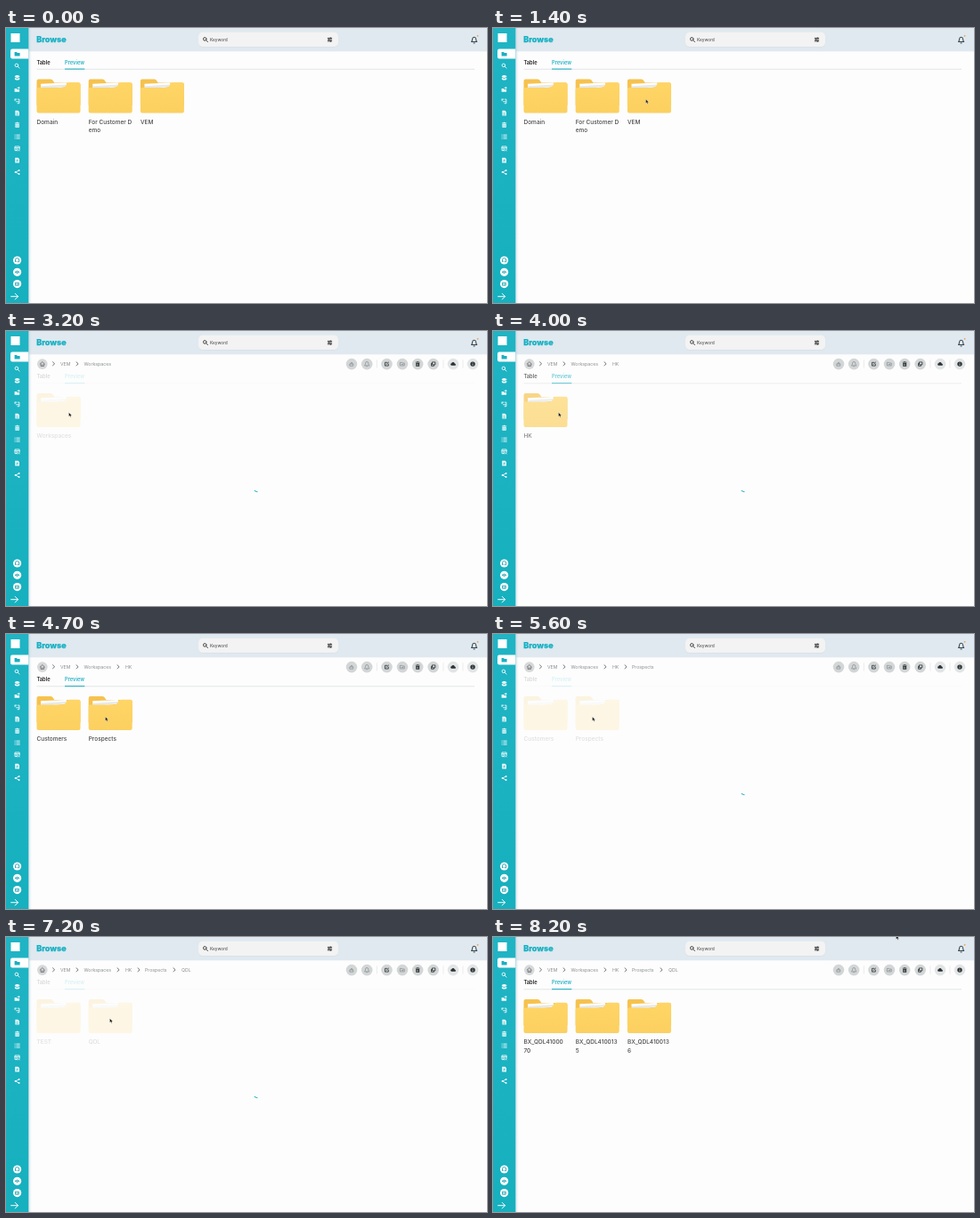
Write an HTML page that moves like this. It is 540 px wide and 309 px high and loops after 8300 ms.

```html
<!DOCTYPE html>
<html lang="en">
<head>
<meta charset="utf-8">
<title>File browser</title>
<style>
  html, body { margin: 0; width: 100%; height: 100%; overflow: hidden; background: #fdfdfd; }
  svg { display: block; width: 100vw; height: 100vh; }
  text { font-family: Inter, "Open Sans", sans-serif; fill: #444; }
  .title { font-size: 9px; font-weight: 800; fill: #16b0c3; stroke: #16b0c3; stroke-width: .25px; }
  .hint { font-size: 4.8px; }
  .tab { font-size: 5.7px; font-weight: 600; fill: #222; }
  .tab.on { fill: #28b2c6; }
  .label { font-size: 6.5px; font-weight: 500; fill: #4a4a4a; }
  .crumb { font-size: 5.2px; fill: #8b8d8f; }
  .line { fill: none; stroke: currentColor; stroke-width: .9; stroke-linecap: round; stroke-linejoin: round; }
  .fill { fill: currentColor; }
</style>
</head>
<body>
<svg viewBox="0 0 540 309" preserveAspectRatio="none">
  <defs>
    <linearGradient id="side" x2="0" y2="1">
      <stop stop-color="#20b4c4"/><stop offset="1" stop-color="#16b0be"/>
    </linearGradient>
    <linearGradient id="edge">
      <stop stop-color="#9fc5cc" stop-opacity=".55"/><stop offset="1" stop-color="#dde" stop-opacity="0"/>
    </linearGradient>
    <linearGradient id="front" x2="0" y2="1">
      <stop stop-color="#ffd566"/><stop offset="1" stop-color="#fbd060"/>
    </linearGradient>
    <g id="folder">
      <path fill="#f6c24e" d="M0 3Q0 .8 2 .8H15.5Q17.5 .8 18.5 2.6L19.8 4.6H47Q49 4.6 49 6.6V30H0Z"/>
      <path fill="#fff" d="M4.5 6L33 4.8 35 9 5 13Z"/>
      <path fill="#e6e9ea" d="M5 8.5L33 6.8V9L5 12Z"/>
      <path fill="url(#front)" d="M0 12.2Q0 10.2 2 10.2H29Q31.5 10.2 32.6 8L33.7 6Q34.7 4.4 36.8 4.4H47Q49 4.4 49 6.4V36.8Q49 38.8 47 38.8H2Q0 38.8 0 36.8Z"/>
    </g>
  </defs>
  <rect width="540" height="309" fill="#fdfdfd"/>
  <rect x="25" width="515" height="26.3" fill="#dfe9ef"/>
  <rect x="25" width="4" height="309" fill="url(#edge)"/>
  <rect width="25.3" height="309" fill="url(#side)"/>
  <rect x="5.5" y="6" width="10" height="10" fill="#fff"/>
  <path d="M7 23.6H25.3V34.4H7Q5 34.4 5 32.4V25.6Q5 23.6 7 23.6Z" fill="#fff"/>
  <text class="title" x="34.3" y="16.4">Browse</text>
  <rect x="216" y="5.2" width="157" height="16.4" rx="4.5" fill="#d3dce1"/>
  <rect x="216" y="4.8" width="157" height="16.2" rx="4.5" fill="#f3f3f3"/>
  <text class="hint" x="229" y="14.9">Keyword</text>
  <g id="chrome"></g>
  <g id="bar"></g>
  <g id="content"></g>
  <circle id="spin" cx="282.5" cy="175.7" r="5" fill="none" stroke="#35b9cb" stroke-width="1.1" stroke-dasharray="8 40" stroke-dashoffset="4"/>
  <path id="cursor" d="M0 0V4.6L1.1 3.7 1.9 5.3 2.7 4.9 2 3.4H3.4Z" fill="#111" stroke="#fff" stroke-width=".35"/>
</svg>
<script>
const LOOP = 8300, STEP = 100;
const $ = id => document.getElementById(id);

// Icons drawn around 0,0
const line = d => `<path class="line" d="${d}"/>`;
const fill = d => `<path class="fill" fill-rule="evenodd" d="${d}"/>`;
const icons = {
  folder: fill('M-3-2.2H-.6L.2-1.3H3V2.3H-3Z'),
  search: line('M1.1-.6A1.8 1.8 0 1 1-2.5-.6A1.8 1.8 0 1 1 1.1-.6M.7 .8L2.5 2.6'),
  stack: fill('M-2.7-1.8Q0-3.8 2.7-1.8V-.7Q0 1-2.7-.7ZM-2.7 .2Q0 1.7 2.7 .2V1.9Q0 3.7-2.7 1.9Z'),
  share: fill('M-3-1H-1L0 0H2.5V2.7H-3ZM0-2.2H1.6V-3.2L3.2-1.7 1.6-.3V-1.2H0Z'),
  flow: line('M-2.5-2.2H-.6M-2.5-2.2V-.6M1-2.2H2.3V0M-1 .4H2.3V2.4H.5'),
  file: fill('M-2.2-2.9H.8L2.3-1.4V2.9H-2.2ZM-1.2 0V.6H1.2V0ZM-1.2 1.3V1.9H1.2V1.3Z'),
  bin: fill('M-2.6-2.5H-1L-.6-3.1H.6L1-2.5H2.6V-1.7H-2.6ZM-2.2-1.2H2.2V2.9H-2.2ZM-1-.3V2H-.5V-.3ZM.5-.3V2H1V-.3Z'),
  list: line('M-.8-2H2.7M-.8 0H2.7M-.8 2H2.7M-2.6-2H-2.4M-2.6 0H-2.4M-2.6 2H-2.4'),
  table: line('M2.5 .3V-2.4H-2.6V2.2H0M-2.6-.7H2.5M-.5-.7V2.2M1.2 1.2L2.6 2.6M2.6 1.2L1.2 2.6'),
  page: fill('M-2.4-2.9H1L2.4-1.5V2.9H-2.4ZM-.9-1V1.9H-.3V.8H1V-1ZM-.3-.4H.4V.2H-.3Z'),
  nodes: line('M2-2L-2 0L2 2') + fill('M1-2A1 1 0 1 0 3-2A1 1 0 1 0 1-2M-3 0A1 1 0 1 0-1 0A1 1 0 1 0-3 0M1 2A1 1 0 1 0 3 2A1 1 0 1 0 1 2'),
  head: line('M-2.2 1V-.4A2.2 2.2 0 0 1 2.2-.4M2.2 .2V1.8H.4M-2.2 .2V1.5H-1.4'),
  eye: line('M-2.4 0Q0-2.8 2.4 0Q0 2.8-2.4 0M-.2 0H.2'),
  smile: line('M-1.8-1.5H1.8V1.7H-1.8ZM-.8 .3Q0 1 .8 .3'),
  arrow: line('M-3.6 0H3.6M.6-3L3.6 0L.6 3'),
  sliders: line('M-2.2-1.7H2.2M-2.2 0H2.2M-2.2 1.7H2.2M.8-2.2V-1.2M-.8-.5V.5M.8 1.2V2.2'),
  bell: line('M-2.7 1.7Q-1.8 .8-1.8-1Q-1.6-2.9 0-2.9Q1.6-2.9 1.8-1Q1.8 .8 2.7 1.7ZM-.5 2.9H.5'),
  home: line('M-2.5 0L0-2.4L2.5 0M-1.8 0V2.4H1.8V0M0 .8V2.2'),
  lock: line('M-1.9-.2H1.9V2.3H-1.9ZM-1-.4V-1.2Q0-3.2 1-1.2V-.4'),
  edit: line('M.4-2H-2.2V2.2H2V0M-.6 .6L2.3-2.3'),
  move: line('M-2.5-1.9H-.7L0-1.2H2.5V2H-2.5ZM-1 .4H1'),
  copy: line('M-1-2.4H2.4V.9H-1ZM-1.2-.8H-2.4V2.4H.8V1.2'),
  cloud: fill('M-2 1.9Q-3.4 1.8-3.2 .3Q-3-.8-1.9-.9Q-1.4-2.6 .2-2.4Q1.6-2.2 1.9-.8Q3.3-.6 3.2 .6Q3.1 1.9 2 1.9Z'),
  info: fill('M-3 0A3 3 0 1 0 3 0A3 3 0 1 0-3 0M-.4-.5H.4V1.8H-.4ZM-.4-1.7H.4V-1H-.4Z'),
  next: line('M-1-2L1.1 0L-1 2')
};
const icon = (name, x, y, color, scale = 1) =>
  `<g transform="translate(${x} ${y}) scale(${scale})" color="${color}">${icons[name]}</g>`;
const disc = (x, y, r, color) => `<circle cx="${x}" cy="${y}" r="${r}" fill="${color}"/>`;
const text = (cls, x, y, s) => `<text class="${cls}" x="${x}" y="${y}">${s}</text>`;

const menu = ['folder', 'search', 'stack', 'share', 'flow', 'file', 'bin', 'list', 'table', 'page', 'nodes'];
$('chrome').innerHTML =
  menu.map((n, i) => icon(n, 12.6, 29.2 + i * 13.28, i ? '#eefbfc' : '#1ab0c0')).join('') +
  ['head', 'eye', 'smile'].map((n, i) =>
    disc(12.6, 261 + i * 13.3, 4.6, '#fff') + icon(n, 12.6, 261 + i * 13.3, '#1a9fae', .95)).join('') +
  icon('arrow', 9.6, 301.7, '#fff', 1.1) +
  icon('search', 224, 13, '#333') + icon('sliders', 363.5, 13.1, '#333') +
  icon('bell', 525.6, 13.6, '#3b4950', 1.15) + disc(529.6, 8.8, .9, '#eea04a');

// Each view: click time, time the list is ready, path, folder labels
const views = [
  { go: 0, ready: 0, path: [], items: ['Domain', 'For Customer D|emo', 'VEM'] },
  { go: 1500, ready: 1900, path: ['VEM'], items: ['Workspaces'] },
  { go: 2900, ready: 3400, path: ['VEM', 'Workspaces'], items: ['HK'] },
  { go: 4000, ready: 4500, path: ['VEM', 'Workspaces', 'HK'], items: ['Customers', 'Prospects'] },
  { go: 5400, ready: 5900, path: ['VEM', 'Workspaces', 'HK', 'Prospects'], items: ['TEST', 'QDL'] },
  { go: 6900, ready: 7400, path: ['VEM', 'Workspaces', 'HK', 'Prospects', 'QDL'],
    items: ['BX_QDL41000|70', 'BX_QDL410013|5', 'BX_QDL410013|6'] }
];
const crumbX = [61, 87.5, 134, 156, 197];
const nextX = [53.5, 80, 126, 149, 189];
const tools = [['lock', 388], ['bell', 405.2], ['edit', 427.5], ['move', 445], ['bin', 462.2],
  ['copy', 479.7], ['cloud', 502], ['info', 524]];

function barMarkup({ path }) {
  if (!path.length) return '';
  return disc(40.8, 37.1, 5.8, '#d6d8d9') + icon('home', 40.8, 37, '#777') +
    path.map((p, i) => icon('next', nextX[i], 36.8, '#666') + text('crumb', crumbX[i], 38.9, p)).join('') +
    tools.map(([n, x], i) =>
      disc(x, 37.1, 6.3, i < 6 ? '#d3d6d7' : '#e2e5e6') +
      icon(n, x, 37.1, i < 2 || i === 3 ? '#909395' : '#2c3032', .9)).join('') +
    [416.4, 491, 513].map(x => `<path d="M${x} 32.5V41.5" stroke="#e2e4e5" stroke-width=".7"/>`).join('');
}

function listMarkup(items, dy) {
  return `<g transform="translate(0 ${dy})">` +
    text('tab', 34.5, 40.9, 'Table') + text('tab on', 66, 40.9, 'Preview') +
    '<path d="M34.5 46.3H526" stroke="#dcdfe1" stroke-width=".8"/>' +
    '<path d="M66 46.1H88.3" stroke="#28b2c6" stroke-width="1.1"/>' +
    items.map((s, i) => {
      const x = 34.5 + i * 58.2;
      return `<use href="#folder" x="${x}" y="56.8"/>` +
        s.split('|').map((row, j) => text('label', x, 107.6 + j * 9.4, row)).join('');
    }).join('') + '</g>';
}

// Pointer path: time, x, y
const track = [[500, 300, -6], [1300, 171.5, 80], [2100, 171.5, 80], [2700, 70.5, 91.5], [3900, 70.5, 91.5],
  [4500, 111.5, 93], [5800, 111.5, 93], [6200, 116.5, 91.5], [7400, 116.5, 91.5], [8200, 452.5, -2]];
const ease = u => u * u * (3 - 2 * u);

function pointer(t) {
  const i = track.findIndex(k => k[0] >= t);
  if (i < 1) return [track[0][1], track[0][2]];
  const [a, b] = [track[i - 1], track[i]];
  const u = ease((t - a[0]) / (b[0] - a[0]));
  return [a[1] + (b[1] - a[1]) * u, a[2] + (b[2] - a[2]) * u];
}

let shown = '';
function draw(t) {
  const n = views.filter(v => v.go <= t).length - 1;
  const view = views[n], busy = t < view.ready;
  const key = n + '-' + busy;
  if (key !== shown) {
    shown = key;
    $('bar').innerHTML = barMarkup(view);
    $('content').innerHTML = listMarkup(views[busy ? n - 1 : n].items, n ? 12.5 : 0);
  }
  $('content').setAttribute('opacity', busy ? Math.max(.16, 1 - (t - view.go + STEP) / 300) : 1);
  $('spin').setAttribute('visibility', busy ? 'visible' : 'hidden');
  $('spin').setAttribute('transform', `rotate(${90 + (t - 3200) * .45} 282.5 175.7)`);
  $('cursor').setAttribute('transform', `translate(${pointer(t)})`);
}

function tick() {
  draw(Math.floor(performance.now() % LOOP / STEP) * STEP);
  requestAnimationFrame(tick);
}
tick();
</script>
</body>
</html>
```
